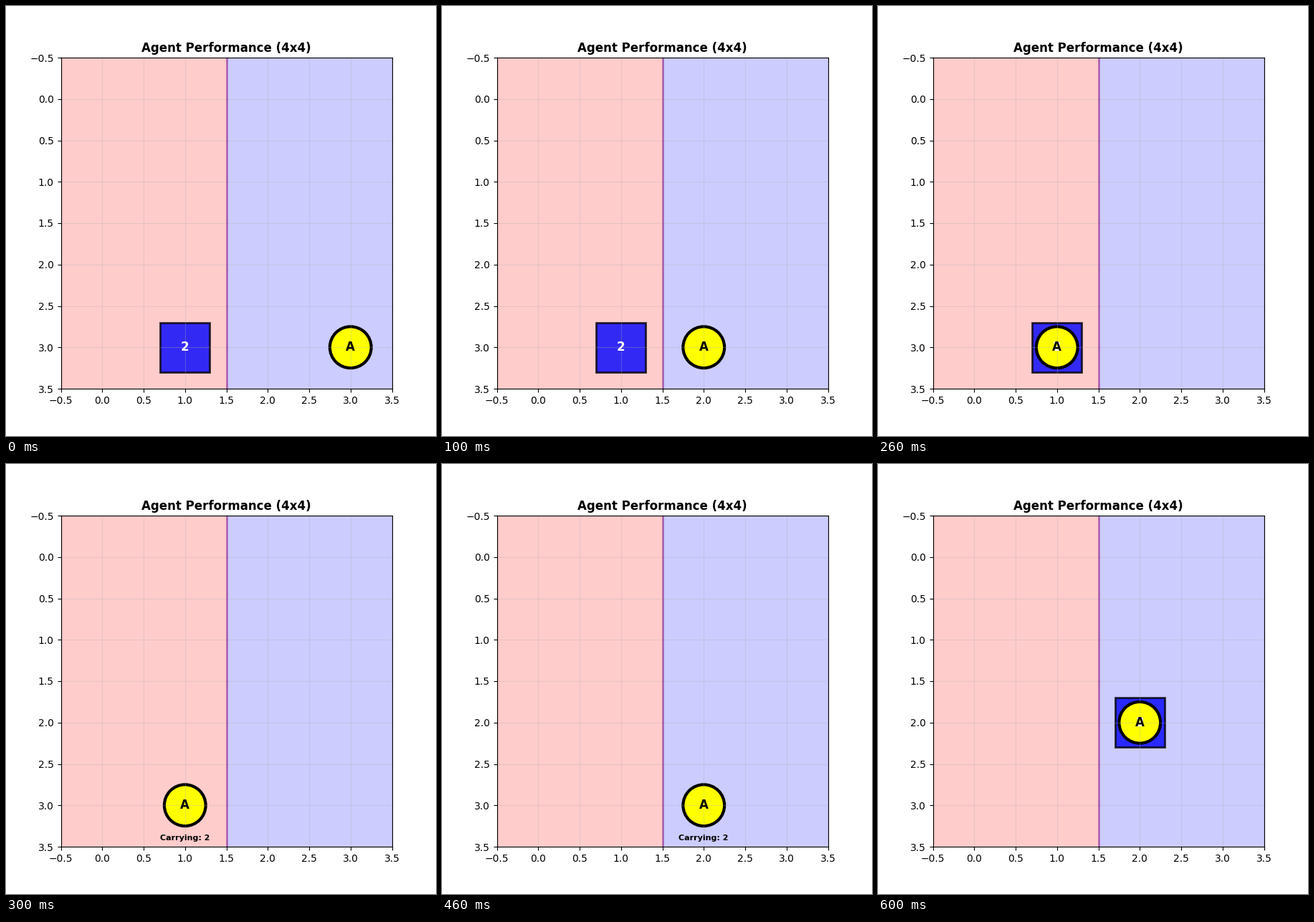
Animation, 600 px wide and 600 px high, one loop 700 ms. Source, as a matplotlib script:

```python
import matplotlib.pyplot as plt
from matplotlib.animation import FuncAnimation
from matplotlib.patches import Circle, Rectangle

SIZE = 4
STEP_MS = 100
PATH = [(3, 3), (2, 3), (1, 3), (1, 3), (2, 3), (2, 2), (2, 2)]
PICK, DROP = 3, 6  # steps at which the block is lifted and put down

fig, ax = plt.subplots(figsize=(6, 6), dpi=100)


def label(x, y, text, size=12, color="black"):
    ax.text(x, y, text, ha="center", va="center", fontsize=size,
            fontweight="bold", color=color)


def draw_zones():
    half = SIZE / 2
    for x, color in ((-0.5, "red"), (half - 0.5, "blue")):
        ax.add_patch(Rectangle((x, -0.5), half, SIZE, color=color, alpha=0.2))
    ax.axvline(half - 0.5, color="purple", linewidth=2, alpha=0.4)


def draw_block(x, y):
    ax.add_patch(Rectangle((x - 0.3, y - 0.3), 0.6, 0.6, facecolor="blue",
                           edgecolor="black", linewidth=2, alpha=0.8))
    label(x, y, "2", color="white")


def draw_agent(x, y, carrying):
    ax.add_patch(Circle((x, y), 0.25, facecolor="yellow",
                        edgecolor="black", linewidth=3))
    label(x, y, "A")
    if carrying:
        label(x, y + 0.4, "Carrying: 2", size=8)


def draw(step):
    ax.clear()
    ax.set_xlim(-0.5, SIZE - 0.5)
    ax.set_ylim(SIZE - 0.5, -0.5)
    ax.set_aspect("equal")
    ax.grid(True, alpha=0.3)
    ax.set_title("Agent Performance (4x4)", fontsize=12, fontweight="bold")

    carrying = PICK <= step < DROP
    draw_zones()
    if not carrying:
        draw_block(*(PATH[PICK] if step < PICK else PATH[DROP]))
    draw_agent(*PATH[step], carrying)


anim = FuncAnimation(fig, draw, frames=len(PATH), interval=STEP_MS,
                     init_func=lambda: None, repeat=True, repeat_delay=0)
plt.show()
```
